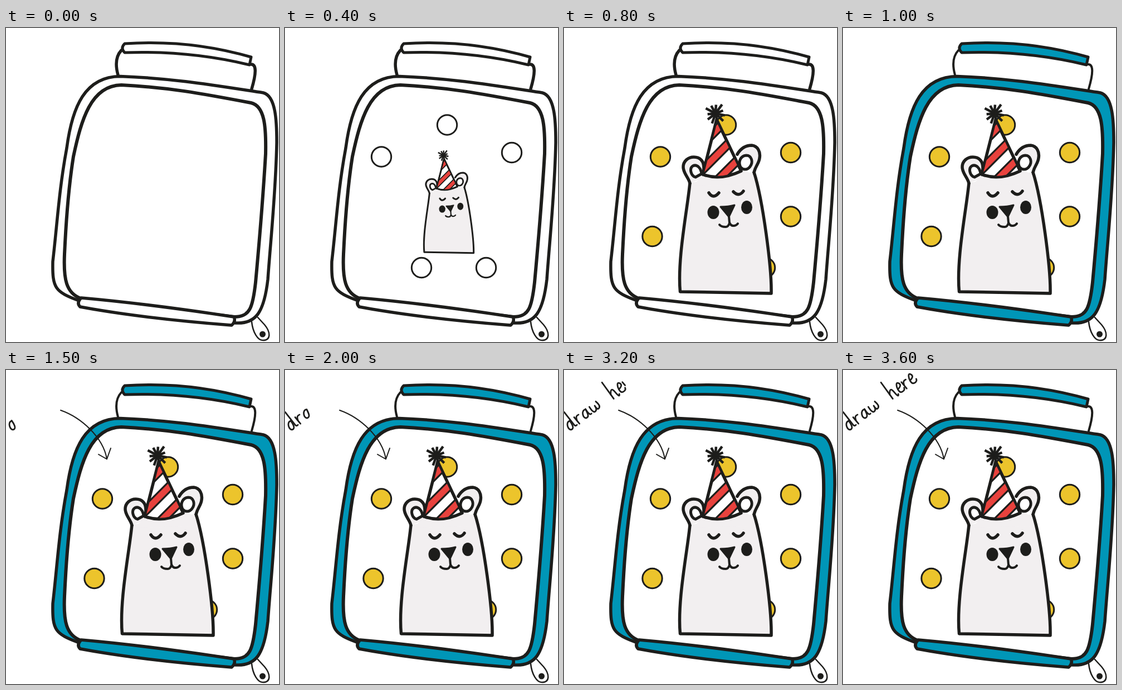
An HTML page for the animation above (5800 ms loop, 490 by 562 pixels).

```html
<!DOCTYPE html>
<html lang="en">
<head>
<meta charset="utf-8">
<style>
  html, body { margin: 0; width: 100%; height: 100%; overflow: hidden; background: #fff; }
  svg { display: block; width: 490px; height: 562px; }
  .line { fill: none; stroke: #1d1d1b; stroke-linecap: round; stroke-linejoin: round; }
  .ink { fill: #1d1d1b; stroke: none; }
  .fur { fill: #f2eff0; }
  .white, .cloth { fill: #fff; }
  .blue .cloth { fill: #0096b7; }
  .blue .wire { stroke-width: 4; }
</style>
</head>
<body>
<svg viewBox="0 0 490 562">
  <g id="bag" class="line" stroke-width="5.500">
    <path class="wire" d="M207 40Q193 55 201 84M440 65Q454 65 441 109"/>
    <path class="cloth" stroke-width="5" d="M213 28Q330 20 440 52L437 66Q330 40 213 44Q205 36 213 28Z"/>
    <path stroke-width="2.500" d="M441 526C443 545 452 559 461 559C476 559 475 544 464 531L452 518"/>
    <circle class="ink" cx="460.500" cy="548" r="5.500"/>
    <path class="cloth" d="M131 488C88 472 83 466 84 418C92 350 95 290 109 215C119 140 142 87 205 86.500C300 90 370 102 462 116C484 122 486 165 486 205C484 300 474 390 470 450C463 510 448 530 412 528Z"/>
    <path class="white" stroke-width="6" d="M134 484C108 474 103 450 105 405C108 340 113 280 121 230C135 165 152 103 207 102C290 106 350 117 440 134C464 140 467 175 466 225C461 310 454 390 448 455C443 500 438 517 410 517Z"/>
    <path class="cloth" d="M135 483Q250 493 409 517Q413 525 405 532Q240 519 133 499Q126 492 135 483Z"/>
  </g>
  <g id="dots" class="line" stroke-width="3"></g>
  <g id="bear" class="line" stroke-width="5.500">
    <path class="fur" d="M226 277C222 322 203 412 208.500 472L372 475C373 430 357 308 341 258"/>
    <path class="fur" d="M226 278C224 268 214 260 214 249C214 238 223 231 233 231C245 231 251 239 251 250V268"/>
    <path class="white" stroke-width="5" d="M236 267C227 264 225 251 231 247C239 243 246 251 247 261Z"/>
    <path class="fur" d="M311 226C318 214 328 210 337 210C348 211 353 222 351 233C350 243 342 249 341 260"/>
    <path class="white" stroke-width="5" d="M317 249C312 239 317 229 327 228C337 228 340 240 334 248C329 255 321 254 317 249Z"/>
    <path class="fur" stroke="none" d="M250 264L318 255L339 260L337 280L230 282Z"/>
    <clipPath id="cone"><path id="hat" d="M274 164L249 262Q280 274 318 256Z"/></clipPath>
    <use href="#hat" class="white"/>
    <g id="stripes" clip-path="url(#cone)"></g>
    <use href="#hat" stroke-width="4"/>
    <g id="pom"></g>
    <path d="M260 295Q268 307 278 295M304 293Q314 303 322 292"/>
    <ellipse class="ink" cx="268" cy="330" rx="10.500" ry="12"/>
    <ellipse class="ink" cx="328" cy="321" rx="10" ry="12"/>
    <path style="fill:#1d1d1b" stroke-width="3" d="M281 320Q295 320 306 317L296 338Z"/>
    <path stroke-width="4" d="M296 337L297 349Q295 356 290 356Q282 356 279 352M297 348Q299 354 304 354Q309 354 312 350"/>
  </g>
  <path id="arrow" class="line" stroke-width="2" d="M98 72C135 85 174 120 181 159M166 151L181 159.500L188 140"/>
  <g id="words" class="line" stroke-width="2.800" transform="translate(10 109) rotate(-36)"></g>
</svg>
<script>
const $ = id => document.getElementById(id);
const show = (node, on) => node.setAttribute('visibility', on ? 'visible' : 'hidden');

function add(parent, tag, attrs) {
  const node = document.createElementNS('http://www.w3.org/2000/svg', tag);
  for (const key in attrs) node.setAttribute(key, attrs[key]);
  return parent.appendChild(node);
}

// Centre of each dot and the moment it appears
const dots = [
  [173, 230.5, 200], [407, 223, 200], [245, 429, 200], [291, 173.5, 400],
  [361, 429, 400], [158.5, 373, 600], [407, 337.5, 600]
].map(([cx, cy, start]) => ({ start, node: add($('dots'), 'circle', { cx, cy, r: 17.7 }) }));

// Diagonal hat stripes: red with a black edge
for (let i = 0; i < 3; i++) {
  const d = `M200 ${256 + 46 * i}l150 -150`;
  add($('stripes'), 'path', { d, 'stroke-width': 17.5 });
  add($('stripes'), 'path', { d, 'stroke-width': 11, style: 'stroke:#e8423d' });
}

for (let i = 0; i < 11; i++) {
  const angle = i * Math.PI * 2 / 11 + 0.2;
  const r = 17 + 3 * Math.sin(i * 2.3);
  add($('pom'), 'path', {
    'stroke-width': 4.5, 'stroke-linecap': 'butt',
    d: `M272 153l${r * Math.cos(angle)} ${r * Math.sin(angle)}`
  });
}

// Handwriting: advance width, then pen strokes with their duration in steps
const glyphs = {
  d: [19, [2, 'M11-14C3-18-2-2 4 0S11-8 11-15'], [1, 'M12-33L13-3Q14 0 17-1']],
  r: [14, [1, 'M2-15L3 0'], [1, 'M3-8Q5-16 11-14']],
  a: [19, [2, 'M13-14C5-19-1-3 5-1S12-8 13-14'], [1, 'M13-15Q12 0 17-2']],
  w: [20, [4, 'M2-14Q1 0 6-1T11-10Q10 0 15-2T17-15']],
  h: [15, [2, 'M0-36V0'], [2, 'M0-9Q8-22 9-8T13-1']],
  e: [13, [2.5, 'M2-8Q13-10 10-16T3-12Q0-1 6 0T13-4']],
  ' ': [26]
};
const strokes = [];
let x = 0, step = 0;
for (const letter of 'draw here') {
  const [advance, ...parts] = glyphs[letter];
  for (const [length, d] of parts) {
    const node = add($('words'), 'path', { d, pathLength: 1, transform: `translate(${x})` });
    strokes.push({ node, start: step, length });
    step += length;
  }
  x += advance;
}

function draw(t) {
  for (const { node, start } of dots) show(node, t >= start);
  $('dots').style.fill = t >= 800 ? '#ecc42c' : '#fff';
  $('bag').classList.toggle('blue', t >= 1000);

  const scale = t < 600 ? 0.543 : t < 800 ? 0.747 : 1;
  const left = 1 - scale;
  $('bear').setAttribute('transform', `translate(${299 * left} ${317 * left}) scale(${scale})`);
  show($('bear'), t >= 400);
  show($('arrow'), t >= 1200);

  const pen = Math.floor((t - 1400) / 100) + 1;
  for (const { node, start, length } of strokes) {
    const part = Math.max(0, Math.min(1, (pen - start) / length));
    show(node, part > 0);
    node.setAttribute('stroke-dasharray', part < 1 ? `${part} 2` : 'none');
  }
}

function tick() {
  draw(performance.now() % 5800);
  requestAnimationFrame(tick);
}
tick();
</script>
</body>
</html>
```
